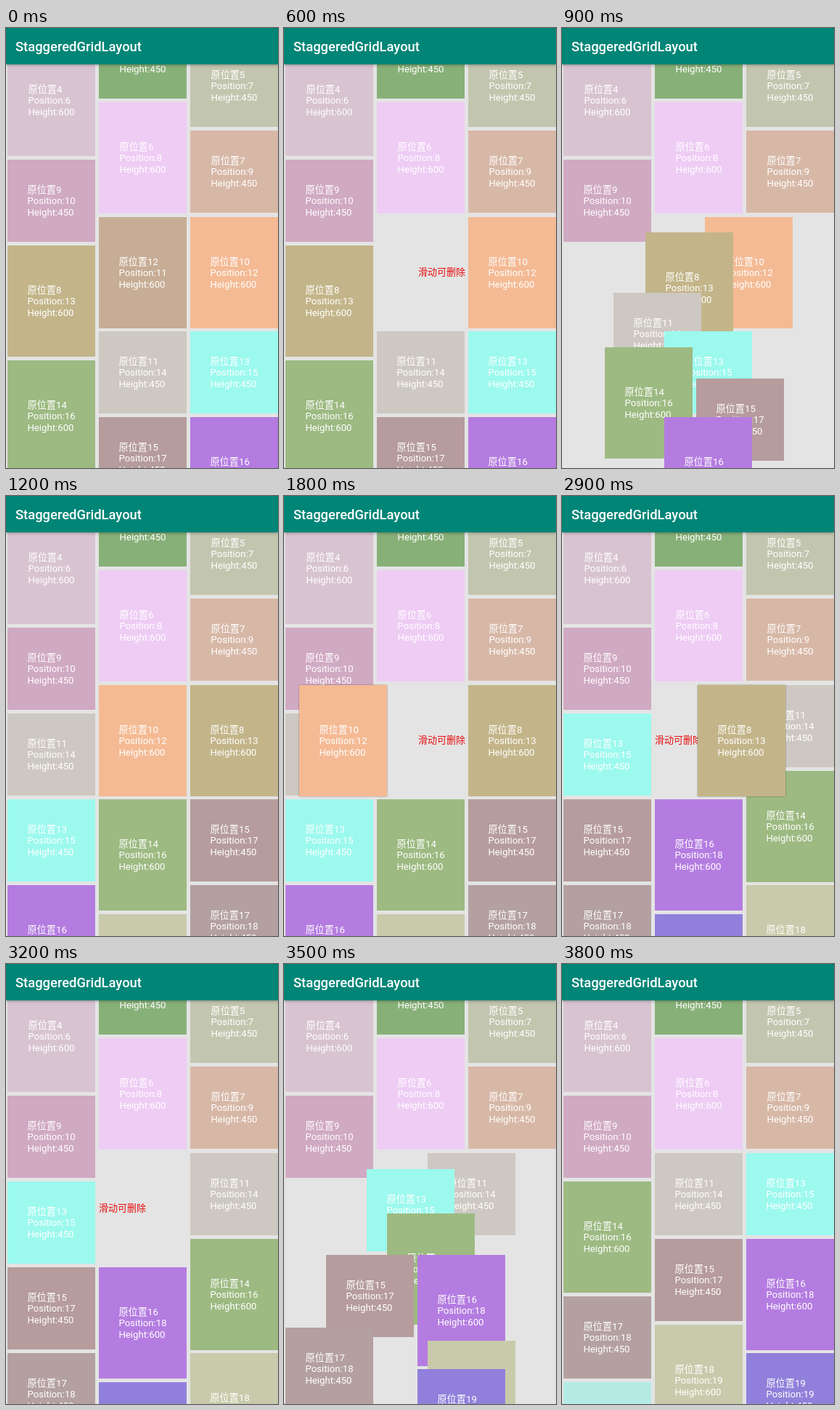
Write an HTML page that moves like this. It is 375 px wide and 605 px high and loops after 3900 ms.

```html
<!DOCTYPE html>
<html lang="zh-CN">
<head>
<meta charset="utf-8">
<title>StaggeredGridLayout</title>
<style>
  html, body { margin: 0; width: 100%; height: 100%; overflow: hidden; }
  body {
    position: relative;
    background: #e4e4e4;
    font-family: Roboto, "Noto Sans CJK SC", "Noto Sans CJK", sans-serif;
  }
  header {
    position: absolute; z-index: 5; left: 0; top: 0; width: 375px; height: 50px;
    box-sizing: border-box; padding-left: 13px;
    background: #008577; color: #fff;
    font-size: 18.4px; font-weight: 500; line-height: 51px;
    box-shadow: 0 1px 4px rgba(0, 0, 0, .35);
  }
  #grid { position: absolute; left: 0; top: 0; width: 375px; height: 605px; overflow: hidden; }
  .card {
    position: absolute; left: 0; top: 0; width: 121px;
    box-sizing: border-box; padding-top: 1px;
    display: flex; align-items: center; justify-content: center;
    color: #fff; font-size: 13.2px; line-height: 15.4px; white-space: pre;
  }
  .card.active { z-index: 2; box-shadow: 0 0 2px rgba(0, 0, 0, .4); }
  #hint {
    position: absolute; left: 128px; top: 260px; width: 122px;
    color: #e80c0c; font-size: 13px; line-height: 151px;
  }
</style>
</head>
<body>
<header>StaggeredGridLayout</header>
<div id="grid"><div id="hint">滑动可删除</div></div>
<script>
const LOOP = 3900, STEP = 100, MOVE = 250, FADE = 80;
const STAGE_H = 605, COL = 126, ROW = 39.4, ROW_ZERO = 260;

// id, position, height, colour
const cards = [
  [3, 5, 450, '#87b078'], [4, 6, 600, '#d8c4d0'], [5, 7, 450, '#c3c6af'],
  [6, 8, 600, '#eeccf4'], [7, 9, 450, '#d7b8a7'], [9, 10, 450, '#d0a9c2'],
  [12, 11, 600, '#c7ad95'], [10, 12, 600, '#f4ba94'], [8, 13, 600, '#c3b589'],
  [11, 14, 450, '#cec8c2'], [13, 15, 450, '#9cf9ee'], [14, 16, 600, '#9dba82'],
  [15, 17, 450, '#b69c9c'], [16, 18, 600, '#b47ce0'], [17, 18, 450, '#b4a0a1'],
  [18, 19, 600, '#c8caab'], [19, 19, 450, '#9180db'], [20, 20, 450, '#b4ebe4'],
].map(([id, pos, height, color]) => ({ id, pos, height, color }));

// Each round: a card is dragged out, then the rest regroup.
const rounds = [
  { id: 12, dir: -1, drag: 300, out: 600, power: 1.6, shown: 800, start: 783 },
  { id: 10, dir: -1, drag: 1400, out: 2000, power: 2.09, shown: 2200, start: 2167 },
  { id: 8, dir: 1, drag: 2700, out: 3200, power: 1.576, shown: 3500, start: 3384 },
];

const grid = document.getElementById('grid');
const hint = document.getElementById('hint');

for (const card of cards) {
  const el = card.el = document.createElement('div');
  el.className = 'card';
  el.style.background = card.color;
  el.style.height = (card.height === 600 ? 153 : 113) + 'px';
  const label = document.createElement('span');
  label.textContent = `原位置${card.id}\nPosition:${card.pos}\nHeight:${card.height}`;
  el.append(label);
  grid.append(el);
}

// Every card goes into the shortest column, leftmost first.
function layout(removed) {
  const ends = [-6, -7, -6], places = {};
  for (const { id, height } of cards) {
    if (removed.includes(id)) continue;
    const col = ends.indexOf(Math.min(...ends));
    places[id] = { x: 2 + COL * col, y: Math.floor(ROW_ZERO + ROW * ends[col]) };
    ends[col] += height / 150;
  }
  return places;
}

const ids = rounds.map(r => r.id);
const layouts = [0, 1, 2, 3].map(n => layout(ids.slice(0, n)));

const clamp = v => Math.max(0, Math.min(1, v));
const ease = v => .5 - .5 * Math.cos(Math.PI * clamp(v));
const mix = (a, b, k) => a + (b - a) * k;

function place({ el }, x, y, alpha = 1, active = false) {
  el.style.transform = `translate(${Math.round(x)}px, ${Math.round(y)}px)`;
  el.style.opacity = alpha;
  el.classList.toggle('active', active);
}

function draw(t) {
  const done = rounds.filter(r => t >= r.shown).length;
  const to = layouts[done], from = layouts[done - 1] || to;
  const age = done ? t - rounds[done - 1].start : Infinity;
  const move = ease(age / MOVE), fade = clamp((age - MOVE) / FADE);
  const swipe = rounds[done];
  const swiping = swipe && t > swipe.drag;

  hint.style.visibility = swiping ? 'visible' : 'hidden';
  if (swiping) hint.style.textAlign = swipe.dir < 0 ? 'right' : 'left';

  for (const card of cards) {
    const a = from[card.id], b = to[card.id];
    if (!b) place(card, 0, 0, 0);
    else if (swiping && card.id === swipe.id) {
      const k = clamp((t - swipe.drag) / (swipe.out - swipe.drag));
      place(card, b.x + swipe.dir * 250 * k ** swipe.power, b.y, k < 1 ? 1 : 0, true);
    } else if (a.y >= STAGE_H) place(card, b.x, b.y, fade);
    else place(card, mix(a.x, b.x, move), mix(a.y, b.y, move));
  }
}

const begin = performance.now();
function tick() {
  const t = (performance.now() - begin) % LOOP;
  draw(Math.floor(t / STEP) * STEP);
  requestAnimationFrame(tick);
}
tick();
</script>
</body>
</html>
```
